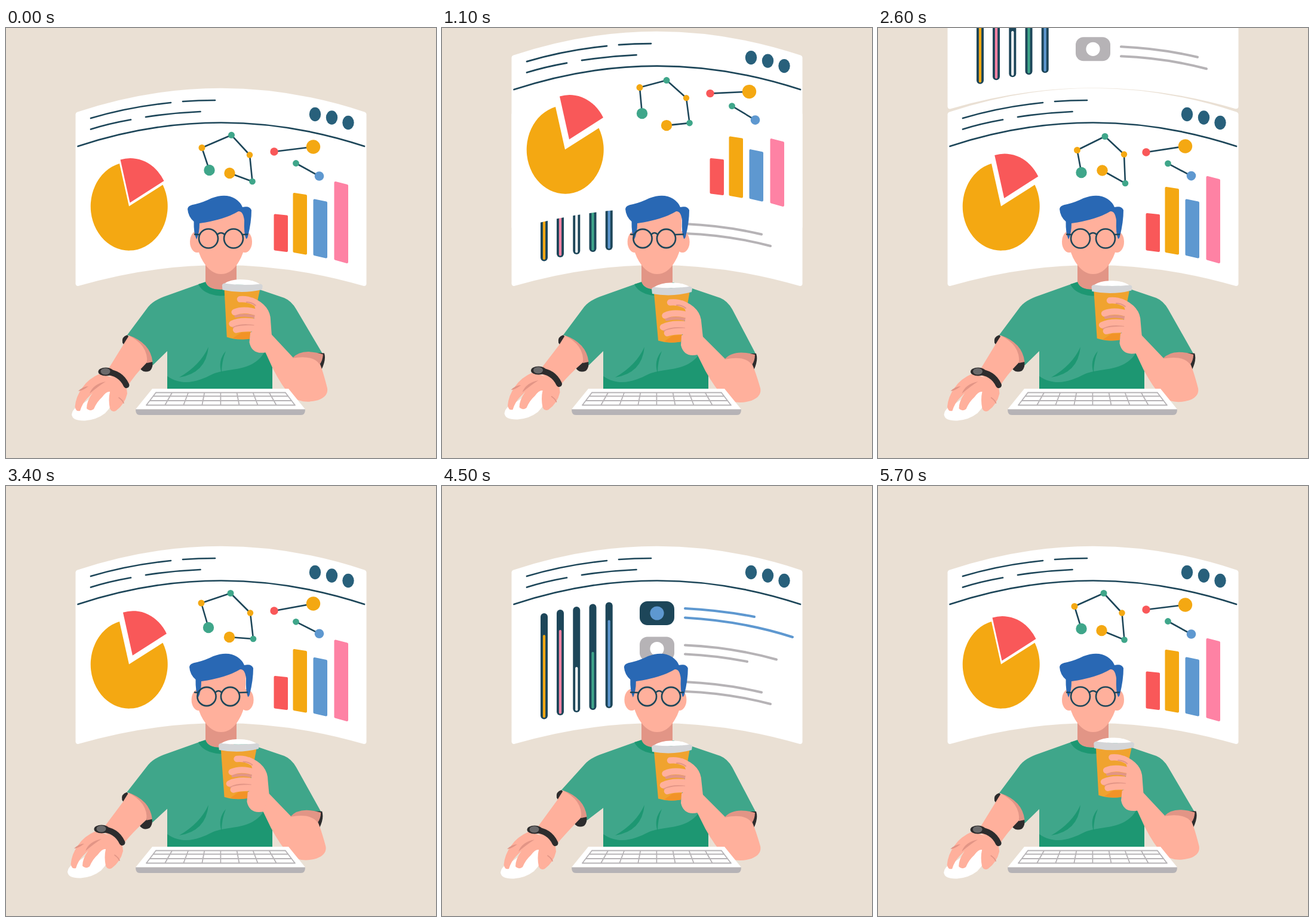
Recreate the animation shown at these times as an HTML page. Size 720x720 px, loop 5800 ms.

```html
<!DOCTYPE html>
<html lang="en">
<head>
<meta charset="utf-8">
<title>Desk dashboard</title>
<style>
html, body { margin: 0; height: 100%; overflow: hidden; background: #eae0d4; }
svg { display: block; width: 100vw; height: 100vh; }
</style>
</head>
<body>
<svg id="stage" viewBox="0 0 720 720"></svg>
<script>
const PERIOD = 2900, STEP = 100;
const navy = '#1d4659', yellow = '#f4a812', red = '#f95859', blue = '#5e98d0', pink = '#fe82a4',
  green = '#3fa68a', deep = '#1d9772', skin = '#ffb09c', shade = '#e29586', hairBlue = '#2968b4',
  black = '#2d2c2d', grey = '#b6b3b6', white = '#fff';

const ease = (t, a, b) => {
  const x = Math.min(1, Math.max(0, (t - a) / (b - a)));
  return x * x * (3 - 2 * x);
};
// Rows are [time, ...values]; values are blended linearly.
function blend(rows, t) {
  const i = Math.max(1, rows.findIndex(r => r[0] >= t));
  const [a, b] = [rows[i - 1], rows[i]], x = (t - a[0]) / (b[0] - a[0]);
  return a.slice(1).map((v, k) => v + (b[k + 1] - v) * x);
}

const fill = (d, c) => `<path d="${d}" fill="${c}"/>`;
const line = (d, c, w) => `<path d="${d}" fill="none" stroke="${c}" stroke-width="${w}" stroke-linecap="round" stroke-linejoin="round"/>`;
const oval = (x, y, rx, ry, c) => `<ellipse cx="${x}" cy="${y}" rx="${rx}" ry="${ry}" fill="${c}"/>`;
const dot = (x, y, r, c) => oval(x, y, r, r, c);
const group = (tf, s) => `<g transform="${tf}">${s}</g>`;
const shift = (x, y, s) => group(`translate(${x} ${y})`, s);

// Chart poses: six graph nodes (x, y), four bar tops, link swing.
const charts = [
  [0, 340.5, 238, 328, 200.5, 377.5, 179.3, 408, 212.5, 412.5, 257, 374.5, 243, 311.5, 276, 286.5, 257, 0],
  [500, 339, 237, 327, 196, 376, 179.5, 409, 212.5, 414, 256, 374, 253, 318, 273, 287, 257.5, 2],
  [1100, 335, 238, 331, 194.5, 376, 182.5, 409, 212, 414.5, 254, 376, 258, 313, 276.5, 298, 280, -2.5],
  [2600, 340.5, 242, 333.5, 204.5, 380, 181.5, 412, 211.5, 414, 260, 375.5, 238.5, 310, 266, 286.5, 248, 1],
  [2800, 340.5, 239, 329, 201.5, 378, 179.5, 408.5, 212.5, 412.5, 257.5, 374.5, 242, 310.5, 274, 286.5, 255, 0],
  [2900, 340.5, 238, 328, 200.5, 377.5, 179.3, 408, 212.5, 412.5, 257, 374.5, 243, 311.5, 276, 286.5, 257, 0]
];
// Mouse offset over time.
const mousePath = [[0, 0, 0], [100, -8, 0], [200, -11.5, 0], [300, -10.5, 0], [500, -7, -1], [600, -5.5, -2],
  [1300, -5.5, -2], [1500, -11, 0], [1600, -12, 0], [1700, -12, 0], [1800, -10.5, 0], [1900, -4, 0],
  [2000, .5, 0], [2600, .5, 0], [2900, 0, 0]];

const sheet = `<path d="M120.5 144.5Q360 65 599.5 144.5V428Q360 358 120.5 428Z" fill="#fff" stroke="#fff" stroke-width="8" stroke-linejoin="round"/>`
  + line('M142 151Q206 132 276 125M296 123Q322 121 350 121M142 169.5Q172 160 209 153.5M234 149Q280 142 325.5 140M120.5 198Q360 119 600 198', navy, 2.7)
  + [[517.5, 144.5], [545.5, 150], [573, 158.5]].map(([x, y]) => oval(x, y, 9.7, 11.7, '#28607b')).join('');

function chartPage(t) {
  const v = blend(charts, t), s = v[16];
  const open = ease(t, 0, 700) - ease(t, 2480, 2800);
  const nodeStyle = [[9.2, green], [5.5, yellow], [5.5, green], [5.2, yellow], [5.3, green], [9.2, yellow]];
  const nodes = nodeStyle.map((n, i) => [v[2 * i], v[2 * i + 1], ...n]);
  const links = [[449, 207 + s, 6.7, red], [514.5, 199 - s, 11.7, yellow],
    [485.5, 226.5 + s * .4, 5.4, green], [524.5, 248 - s * .4, 7.8, blue]];
  const bars = [[448.5, 372, 2, red], [480.5, 375.5, 3, yellow], [514.5, 380.5, 4, blue], [549.5, 388, 5, pink]];
  const span = (a, b) => `M${a[0]} ${a[1]}L${b[0]} ${b[1]}`;
  return sheet
    + fill('M206 298.5L190 227A64.5 74 0 1 0 262.5 262.5Z', yellow)
    + shift(1.5 + open * 5.5, -6 - open * 11, fill('M206 298.5L190 226.5A64.5 74 0 0 1 263 262Z', red))
    + line('M' + nodes.map(n => n[0] + ' ' + n[1]).join('L') + span(links[0], links[1]) + span(links[2], links[3]), navy, 2.6)
    + [...nodes, ...links].map(n => dot(...n)).join('')
    + bars.map(([x, y, k, c], i) => {
      const top = v[12 + i] + 2;
      return `<path d="M${x + 2} ${top}l19.5 ${k}V${y + k - 1}L${x + 2} ${y - 1.5}Z" fill="${c}" stroke="${c}" stroke-width="4" stroke-linejoin="round"/>`;
    }).join('');
}

function sliderPage(t) {
  const p = ease(t, 1400, 2200) * 1.4 - .3;
  const sliders = [[171, 219, 384.5, 250, 7, yellow], [198, 213, 378, 241, -1, pink], [225.3, 208, 373, 303, -1, white],
    [252.5, 203.5, 369, 278, 2, green], [279.7, 200.5, 366, 224, -7, blue]];
  const camera = (y, c, lens) => `<rect x="331" y="${y - 20}" width="58" height="40" rx="13" fill="${c}"/>` + dot(360, y, 11.6, lens);
  return sheet
    + sliders.map(([x, a, b, f, d, c]) => line(`M${x} ${a}V${b}`, navy, 12) + line(`M${x} ${f + d * p + 2}V${b + 1.5}`, c, 4.2)).join('')
    + camera(213, navy, blue) + camera(272.5, grey, white) + camera(332, grey, white)
    + line('M407 205Q466 208 523 219M407 220.5Q503 226 587 253', blue, 4)
    + line('M407 266.5Q487 270 560 290.5M407 281.5Q460 284 511 294M407 328Q474 331 535 345.5M407 344Q482 347 550 365', grey, 4);
}

function head(h) {
  const left = Math.min(h, 0), right = Math.max(h, 0);
  const a = 339 + 3 * left + 4.5 * right, b = 381 + 5.5 * left + 2.5 * right, r = 16 - Math.abs(h) * .4;
  const ears = -2.6 * h, hair = -3 * left + .8 * right;
  return shift(ears, 0, oval(320, 358, 12, 18, skin) + oval(400, 358, 12, 18, skin))
    + fill('M318 318L320 362Q322 378 330 391Q343 412 360 412Q378 412 390 391Q398 378 400 362L402 308L380 298Z', skin)
    + shift(hair, 0, fill('M304 303Q304 297 317 295Q330 292 344 285Q368 276 384 286Q393 292 396 300Q408 297 411 305Q411 325 405 349Q404 353 402 353Q398 344 399 322Q397 306 389 307Q366 321 324 327Q324 344 319 354Q314 344 314.5 324Q305 316 304 303Z', hairBlue))
    + `<g fill="none" stroke="${navy}" stroke-width="2.6"><circle cx="${a}" cy="352.5" r="${r}"/><circle cx="${b}" cy="352.5" r="${r}"/></g>`
    + line(`M${a + r - 1.5} 346Q${(a + b) / 2} 340 ${b - r + 1.5} 346M${a - r + 1.5} 346L316 345.5M${b + r - 1.5} 346L404 345.5`, navy, 2.4);
}

const neck = fill('M334 390H386V432Q360 448 334 432Z', shade);

function shirt(sx, sy, k) {
  return fill(`M323 429L264 450Q246 457 238 467L${203 + sx} ${514 + sy}Q${240 + sx} ${527 + sy} ${245.5 + sx} ${565 + sy}L270 ${541 + sy * .4}V604H446V560L488 552L${526 + 5 * k} 547L486 471Q478 457 466 452L410 433L386 426Q382 438 360 438Q338 438 334 425Z`, green)
    + fill('M322 429L334 425.5Q338 438 360 438Q382 438 386 426L398 429Q385 449 358 448.5Q330 446 322 429Z', deep)
    + fill('M270 583C298 602 325 590 345 580C370 568 415 578 434 540L446 566V604H270Z', deep)
    + fill('M290 585Q325 565 339 534Q335 578 290 585Z', deep)
    + fill('M368 541Q354 557 361 578Q361 558 368 541Z', deep);
}

const mouseHand =
  fill('M110 647Q111 637 124 632L158 609Q176 602 184 614Q179 632 166 645Q152 656 132 657.5Q111 658 110 647Z', white)
  + fill('M159 578Q138 587 128 602Q117 617 115.5 634Q117 643 124 641Q128 628 136 620L145 611Q135 625 135 637Q140 643 147 638Q152 626 161 618Q168 608 174 609Q171 622 174 637Q177 644 184 641Q199 630 203 612L201 595Z', skin)
  + fill('M121 608Q129 600 138 600Q127 608 121 608Z', shade)
  + fill('M140 612Q146 596 167 592Q157 598 140 612Z', shade)
  + line('M189 619Q195 623 197 628', shade, 1.6)
  + line('M166 575.5Q192 577 201.5 598', black, 10)
  + oval(167, 575.5, 12.5, 7, black) + oval(166.5, 575, 8, 5.6, '#6b6a6b');

function mouseArm(dx, dy, sx, sy) {
  return shift(sx, sy, fill('M203 514Q193 517 195 527L226 572Q232 578 241 574Q247 568 245 558Z', black))
    + fill(`M${206 + sx} ${515 + sy}Q${202 + sx} ${521 + sy} ${196 + sx} ${531 + sy}L${167 + dx} ${578 + dy}L${202 + dx} ${602 + dy}Q${216 + dx * .6} 580 ${236 + sx} ${560 + sy}Q${246 + sx} ${532 + sy} ${206 + sx} ${515 + sy}Z`, skin)
    + shift(sx, sy, fill('M204 514Q242 527 245.5 559L236 561Q239 531 204 514Z', shade))
    + shift(dx, dy, mouseHand);
}

const cupArm =
  fill('M500 545L526 545Q530 556 522 573L512 566Z', black)
  + fill('M436 516L474 554Q498 545 518 560Q524 572 533 603Q536 617 518 624Q492 632 473 619Q457 603 441 574L424 540Z', skin)
  + fill('M473 555Q488 537 524 547Q524 557 519 564Q508 548 473 555Z', shade)
  + fill('M355 444L414.5 443L400 525Q380 529 362 523.5Z', '#f0a32f')
  + fill('M372 525L386 515L402 514L400 525.5Q384 528 372 525Z', '#f29327')
  + fill('M355 434Q367 426 385 426.5Q403 426 415 434Z', white)
  + fill('M351 437Q352 433 359 433.5Q385 437 411 433Q418 432 419 436L418 442Q386 451 352 445Z', '#d4d5d7')
  + fill('M356 434Q367 427 385 427Q403 426 414 433Q385 437 356 434Z', white)
  + line('M376 488Q392 484 408 488M373 506Q388 500 408 503', shade, 5)
  + line('M382 459.5Q403 457 420 474M373.5 481.5Q390 474 415 482M370 501Q385 493 412 497M377 511Q390 507 412 508', skin, 10.5)
  + fill('M402 456Q434 468 434.5 495L437 518L428 547Q405 552 400 531L401 515L408 510L406 495L409 478Z', skin)
  + line('M393 464Q402 464 408 469', shade, 2);

function keyboard() {
  const rows = [610.5, 616.5, 624, 631.5].map(y => {
    const k = (y - 610.5) / 21;
    return `M${251 - 16 * k} ${y}H${468 + 16 * k}`;
  });
  const cols = Array.from({ length: 9 }, (_, i) => `M${251 + i * 27.1} 610.5L${235 + i * 31.1} 631.5`);
  return fill('M245 604H473L501 638.5H217Z', white)
    + fill('M217 638.5H501Q501 648 494 648H224Q217 648 217 638.5Z', grey)
    + line(rows.join('') + cols.join(''), grey, 1.8);
}
const keys = keyboard();

function scene(t) {
  const slide = start => -480 * ease(t, start, start + 340);
  const slidersInFront = t >= 1400 && t < 2800;
  const front = slidersInFront ? shift(0, slide(2403), sliderPage(t)) : shift(0, t < 1400 ? slide(1003) : 0, chartPage(t));
  const back = slidersInFront ? (t > 2400 ? chartPage(t) : '') : (t > 1000 && t < 1400 ? sliderPage(t) : '');

  const turn = -ease(t, 100, 400) + 2 * ease(t, 1200, 1500) - ease(t, 2150, 2500);
  const raised = 1 - ease(t, 0, 950) + ease(t, 2200, 2900);
  const [dx, dy] = blend(mousePath, t);
  const pull = Math.max(0, -dx - 5.5) / 6.5, sx = -3 * pull, sy = -5 * pull;

  return back + front + neck + head(turn)
    + shirt(sx, sy, raised) + mouseArm(dx, dy, sx, sy)
    + group(`translate(${5 * raised} ${-raised}) rotate(${2 * raised} 510 600)`, cupArm)
    + keys;
}

const stage = document.getElementById('stage');
let shown = -1;
function draw() {
  const t = Math.floor(performance.now() % PERIOD / STEP) * STEP;
  if (t !== shown) stage.innerHTML = scene(shown = t);
  requestAnimationFrame(draw);
}
draw();
</script>
</body>
</html>
```
